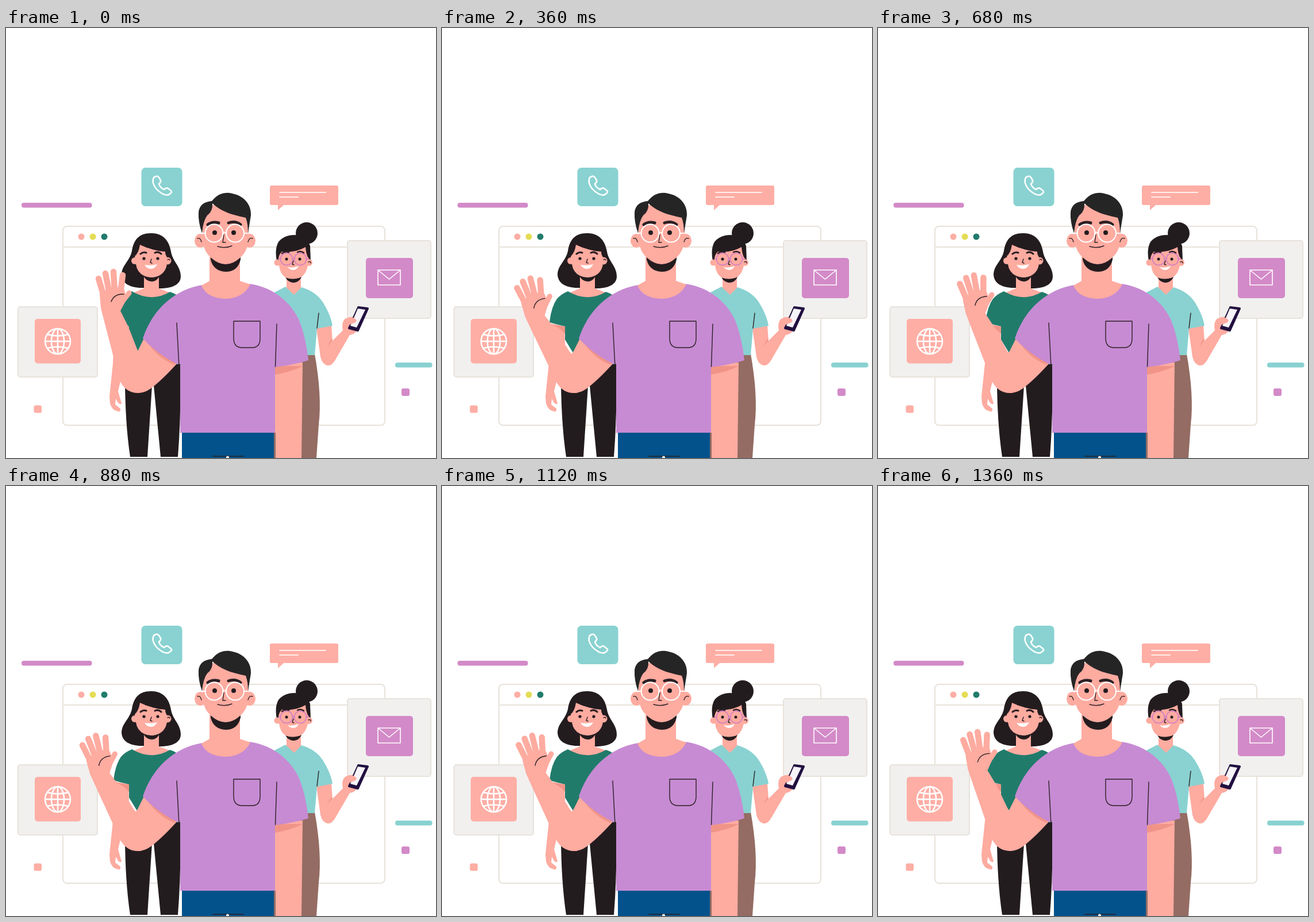
An HTML page that plays this animation: 748 px wide and 748 px high, repeating every 1400 ms.

```html
<!DOCTYPE html>
<html lang="en">
<head>
<meta charset="utf-8">
<title>Waving team</title>
<style>
  html, body { margin: 0; width: 100%; height: 100%; overflow: hidden; background: #fff; }
  svg { display: block; width: 100vw; height: 100vh; }
  .skin { fill: #feaba0; }
  .shade { fill: #f19488; }
  .dark { fill: #231c1f; }
  .pink { fill: #feaea5; }
  .teal { fill: #89d2d1; }
  .green { fill: #217b6b; }
  .violet { fill: #c78bd3; }
  .orchid { fill: #d38ac8; }
  .white { fill: #fff; }
  .frame { stroke: #e8e2db; stroke-width: 2; }
  .card { fill: #f1f0ef; }
  .line { fill: none; stroke: #2b2024; stroke-width: 1.4; stroke-linecap: round; stroke-linejoin: round; }
  .icon { fill: none; stroke: #fff; stroke-width: 2; stroke-linecap: round; stroke-linejoin: round; }
  .fingers { fill: none; stroke: #feaba0; stroke-width: 10.5; stroke-linecap: round; }
</style>
</head>
<body>
<svg viewBox="0 0 748 748">
  <!-- browser window and floating items -->
  <g class="frame">
    <rect x="99" y="345" width="560" height="346" rx="7" fill="#fff"/>
    <path d="M99 381H659"/>
    <rect class="card" x="21" y="485" width="138" height="122" rx="4"/>
    <rect class="card" x="594" y="370" width="145" height="135" rx="4"/>
  </g>
  <circle class="pink" cx="131" cy="363" r="5.5"/>
  <circle cx="151" cy="363" r="5.5" fill="#e4dd55"/>
  <circle class="green" cx="171" cy="363" r="5.5"/>
  <rect class="orchid" x="27" y="304" width="122.500" height="8.500" rx="4"/>
  <rect class="teal" x="677" y="582" width="64.500" height="8.500" rx="4"/>
  <rect class="pink" x="48.500" y="656.500" width="13.500" height="13" rx="3"/>
  <rect class="orchid" x="688" y="627" width="14" height="13" rx="3"/>
  <rect class="teal" x="235.500" y="243" width="71" height="67" rx="7"/>
  <rect class="pink" x="50" y="506" width="80" height="77.500" rx="5"/>
  <rect class="orchid" x="626" y="400" width="82" height="70" rx="5"/>
  <path class="pink" d="M462 274H575Q578 274 578 277V305Q578 308 575 308H483L473 317V308H462Q459 308 459 305V277Q459 274 462 274Z"/>
  <path class="icon" stroke-opacity=".8" d="M476 286H556M476 294H508"/>
  <path class="icon" style="stroke-width:2.6" d="M257 260L261 258Q264 257 266 260L269 265Q270 268 266 271Q267 277 275 281Q279 277 282 279L287 283Q289 285 287 287L283 290Q278 292 270 287Q259 280 256 270Q255 264 257 260Z"/>
  <g class="icon" style="stroke-width:2.5">
    <circle cx="90" cy="545" r="22"/>
    <ellipse cx="90" cy="545" rx="11" ry="22"/>
    <path d="M90 523V567M68 545H112M72 533Q90 538 108 533M72 557Q90 552 108 557"/>
  </g>
  <path class="icon" style="stroke-width:1.6" d="M647 421H686V447H647ZL666.500 437L686 421"/>

  <!-- woman on the left -->
  <path class="dark" d="M251 357C274 356 284 371 287 389C290 407 304 414 304 432C304 447 288 454 262 453L236 452C214 452 201 443 201 428C202 412 215 406 219 388C222 368 232 357 251 357Z"/>
  <path class="skin" d="M240 425H266V453L287 461Q253 478 218 462L240 453Z"/>
  <path class="dark" d="M239 424H267V431Q263 441 253 441Q243 440 239 431Z"/>
  <circle class="skin" cx="224" cy="405" r="6"/>
  <circle class="skin" cx="281" cy="405" r="6.500"/>
  <path class="skin" d="M224 397Q231 391 233 377Q255 388 279 386L280 409Q279 424 266 431Q253 437 240 431Q228 425 226 411Z"/>
  <path class="dark" d="M232 376Q255 370 281 384L282 399Q277 397 277 389Q252 387 232 376Z"/>
  <path class="line" d="M253 402L251 408L254 409M281 403Q284 401 285 404"/>
  <path class="line" style="stroke-width:3" d="M234 393Q239 389 244 391M259 391Q265 388 270 393"/>
  <circle class="dark" cx="240" cy="401" r="2.600"/>
  <circle class="dark" cx="264" cy="401" r="2.600"/>
  <path class="white" d="M241 412Q252 414 263 411Q259 419 252 419Q245 419 241 412Z"/>
  <path class="skin" d="M189 514L213 519L214 550L195 632L201 653Q199 656 195 652L191 645L190 655L199 662Q200 668 195 667Q184 665 181 653L180 641L186 583Z"/>
  <path class="shade" d="M192 516L214 519V532Q204 521 192 516Z"/>
  <path class="green" d="M219 458Q253 478 285 459Q303 464 310 482V585H240L214 542V519Q200 516 187 512Q190 485 200 471Q207 463 219 458Z"/>
  <path class="dark" d="M207 585H303Q305 670 299 746H269L257 622H254L246 746H216Q206 680 207 585Z"/>

  <!-- woman on the right -->
  <circle class="dark" cx="523" cy="357" r="19"/>
  <path class="dark" d="M471 406Q467 384 474 372Q484 360 502 360Q523 361 529 379L530 405H475Z"/>
  <path class="skin" d="M488 425H513V451L522 456L501 470L479 456L488 451Z"/>
  <path class="dark" d="M486 427H514V433Q510 443 499 443Q489 441 486 433Z"/>
  <circle class="skin" cx="472" cy="408" r="5.500"/>
  <circle class="skin" cx="527" cy="408" r="6"/>
  <path class="skin" d="M474 401Q475 393 480 389Q504 391 521 381Q522 394 526 400L525 413Q522 429 512 434Q499 439 486 434Q477 428 475 413Z"/>
  <g class="line" style="stroke:#cf7cc4;stroke-width:1.500">
    <circle cx="488" cy="402" r="10.500"/>
    <circle cx="512" cy="402" r="10.500"/>
    <path d="M498 402Q500 400 502 402M522 402L527 401M477 402L474 401"/>
  </g>
  <path class="line" style="stroke-width:2.500" d="M480 392Q485 388 492 390M507 390Q513 387 518 391"/>
  <circle class="dark" cx="488" cy="402" r="2.500"/>
  <circle class="dark" cx="511" cy="402" r="2.500"/>
  <path class="line" d="M500 405L498 411L501 412M526 407Q530 405 530 409"/>
  <path class="white" d="M490 416Q499 418 509 414Q506 421 500 421Q494 421 490 416Z"/>
  <path fill="#946c63" d="M510 567H537Q550 640 544 690L540 748H510Z"/>
  <path class="skin" d="M540 522L566 518L568 544L586 526Q583 512 590 506L604 502Q611 504 609 510L611 526Q606 533 598 534L573 577Q567 588 559 587Q550 585 547 572Z"/>
  <path class="shade" d="M568 543L559 554L566 541Z"/>
  <path class="teal" d="M463 462L486 450L501 464L514 451Q541 459 553 480Q565 500 568 518L541 523L537 569H500L463 500Z"/>
  <path class="line" d="M544 496L541 522"/>
  <path d="M613 486L629 488L612 526L597 522Z" fill="#21103f" stroke="#21103f" stroke-width="4" stroke-linejoin="round"/>
  <path fill="#f6f4f8" d="M612 488L625 490L610 521L599 518Z"/>
  <path class="skin" d="M588 508Q596 500 606 505Q612 508 608 512L598 516L593 524Z"/>

  <!-- man -->
  <path class="skin" d="M468 582H516L514 748H468Z"/>
  <path class="shade" d="M468 588H516Q497 598 468 603Z"/>
  <path fill="#946c63" d="M465 704H469V748H465Z"/>
  <path fill="#03528b" d="M306 703H466V748H306Z"/>
  <path class="line" d="M360 745H413"/>
  <circle class="white" cx="385.500" cy="747" r="2.500"/>
  <path class="skin" d="M241 538L299 582Q272 612 252 627Q241 635 229 635L216 580L229 562Z"/>
  <path class="shade" d="M244 544L300 580L293 586Q264 575 244 544Z"/>
  <g id="forearm">
    <path class="skin" d="M163 464Q164 458 172 457L202 449Q208 455 207 467L214 464L199 492L213 520L229 561L250 600L229 635Q206 634 197 611L181 549Q172 515 165 487Z"/>
    <path class="fingers" d="M161 436L170 466M173 427L180 462M187 424L189 458M203 430L199 462"/>
    <path class="fingers" style="stroke-width:9" d="M214 461L195 485"/>
    <path class="line" d="M183 476Q188 462 205 463"/>
  </g>
  <path class="violet" d="M341 447Q382 480 424 445C470 452 499 482 511 511Q522 540 526 578Q498 587 468 590V704H303V584L299 585Q264 568 238 540C253 494 289 456 341 447Z"/>
  <path class="skin" d="M354 398H407V440L425 446Q413 470 382 471Q349 470 340 448L354 440Z"/>
  <path class="line" d="M297 513L301 589M471 515L468.500 589M396 510H442V540Q442 556 428 556H411Q396 556 396 540Z"/>
  <path class="dark" d="M356 390H408V403Q403 424 382 424Q361 423 356 403Z"/>
  <ellipse class="skin" cx="338" cy="370" rx="10" ry="12"/>
  <ellipse class="skin" cx="424" cy="370" rx="10" ry="12"/>
  <path class="skin" d="M341 335L352 308H412L422 338L421 371Q420 389 407 400Q382 422 357 400Q344 389 343 372Z"/>
  <path fill="#262526" d="M341 357Q334 337 335 320Q337 303 358 301C370 286 383 285 394 288C414 292 427 307 426 326L421 357Q421 340 417 330C400 326 377 322 359 305Q360 319 350 326Q343 335 341 357Z"/>
  <path class="line" style="stroke-width:5" d="M351 342Q359 336 370 339M387 339Q399 335 408 342"/>
  <g class="icon">
    <circle cx="362" cy="357" r="15.500"/>
    <circle cx="398.500" cy="357" r="15.500"/>
    <path d="M377 357Q380 354 383 357M414 357H420M347 357H342"/>
  </g>
  <circle class="dark" cx="363" cy="356" r="4"/>
  <circle class="dark" cx="396" cy="356" r="4"/>
  <path class="line" d="M379 360L377 373H382M368 380Q381 384 393 379M333 366Q338 364 340 372M429 366Q423 364 421 372"/>
</svg>
<script>
  const LOOP = 1400, STEP = 40;
  // [time in ms, forearm swing in degrees]
  const swing = [[0, 0], [200, 7.8], [350, 11], [520, 10.6], [690, 6.6],
                 [880, 10.2], [1000, 11], [1120, 10], [1360, 4.5], [1400, 0]];
  const forearm = document.getElementById('forearm');

  function slope(i) {
    const [t0, a0] = swing[Math.max(i - 1, 0)];
    const [t1, a1] = swing[Math.min(i + 1, swing.length - 1)];
    return (a1 - a0) / (t1 - t0);
  }

  // Smooth Hermite curve through the keys
  function angleAt(t) {
    const i = swing.findIndex(key => key[0] > t) - 1;
    const [t0, a0] = swing[i], [t1, a1] = swing[i + 1];
    const span = t1 - t0, u = (t - t0) / span, v = 1 - u;
    return a0 * v * v * (1 + 2 * u) + a1 * u * u * (1 + 2 * v)
      + span * u * v * (slope(i) * v - slope(i + 1) * u);
  }

  function draw() {
    const t = Math.floor(performance.now() % LOOP / STEP) * STEP;
    forearm.setAttribute('transform', `rotate(${-angleAt(t)} 230 601)`);
    requestAnimationFrame(draw);
  }
  draw();
</script>
</body>
</html>
```
